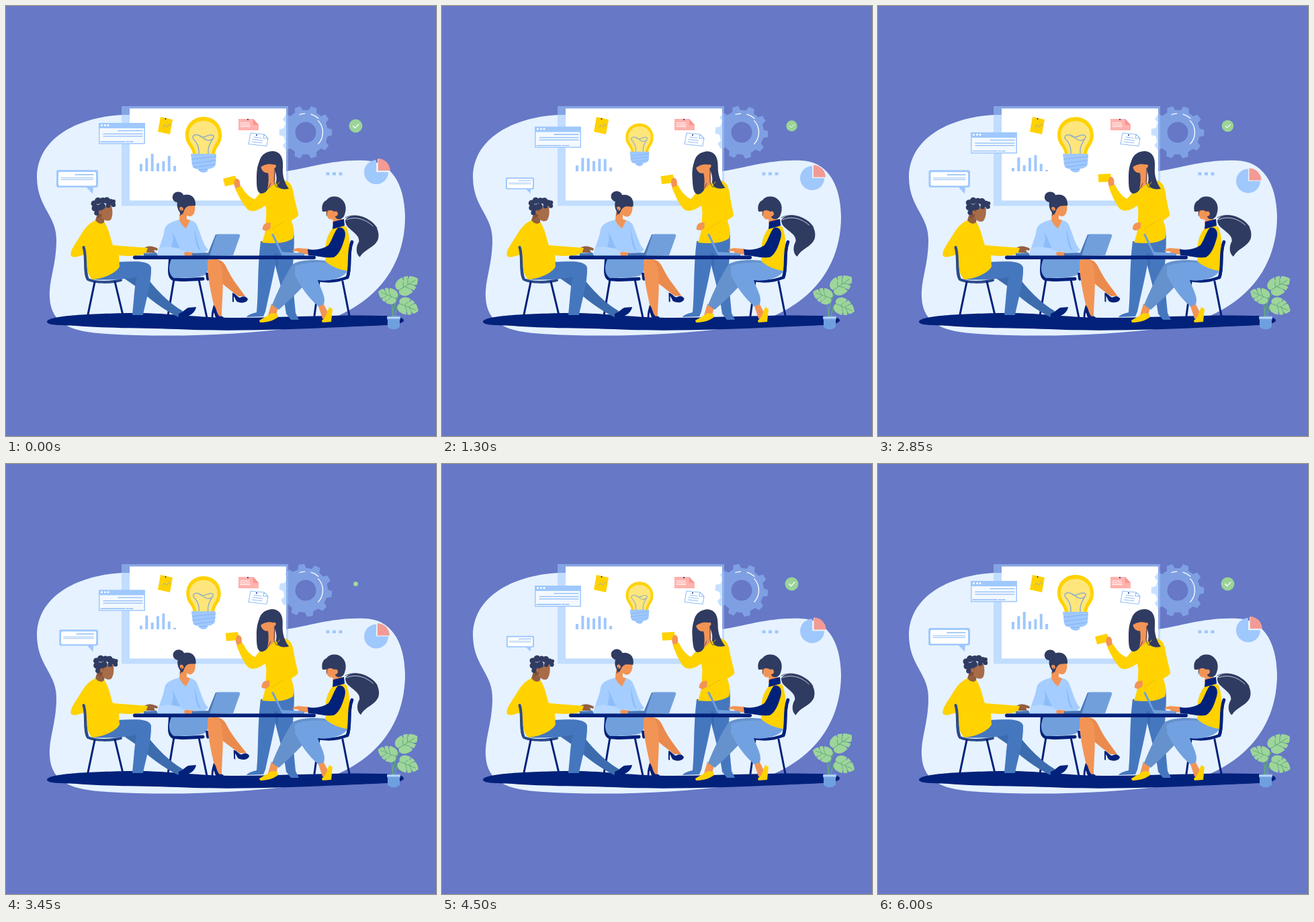
Recreate the animation shown at these times as an HTML page with a canvas. Size 640x640 px, loop 6.1 s.

```html
<!DOCTYPE html>
<html lang="en">
<head>
<meta charset="utf-8">
<title>Team meeting</title>
<style>
html, body { margin: 0; width: 100%; height: 100%; overflow: hidden; background: #6678c6; }
canvas { display: block; width: 100vw; height: 100vh; }
</style>
</head>
<body>
<canvas id="stage" width="640" height="640"></canvas>
<script>
const g = document.getElementById('stage').getContext('2d');
const LOOP = 6100, STEP = 50, TAU = Math.PI * 2;
const C = {
  bg: '#6678c6', blob: '#e6f2ff', sky: '#9fc8fd', navy: '#02217a', hair: '#303b61',
  yellow: '#ffd200', skin: '#f29455', brown: '#925f41', jeans: '#4577bf', dark: '#3c6cae',
  steel: '#709fdc', denim: '#6592cc', leaf: '#9dd59a', stem: '#5fa67e', white: '#fff', pink: '#f39a94'
};

const fill = (c, d) => { g.fillStyle = c; g.fill(new Path2D(d)); };
const line = (c, w, d) => { g.strokeStyle = c; g.lineWidth = w; g.stroke(new Path2D(d)); };
const box = (c, x, y, w, h, r = 0) => {
  g.fillStyle = c; g.beginPath(); g.roundRect(x, y, w, h, r); g.fill();
};
const oval = (c, x, y, rx, ry = rx, a = 0) => {
  g.fillStyle = c; g.beginPath(); g.ellipse(x, y, rx, ry, a, 0, TAU); g.fill();
};
// Draws around a pivot, with optional rotation (degrees), scale and shift.
function pose(x, y, { rot = 0, k = 1, dx = 0, dy = 0 }, draw) {
  g.save();
  g.translate(x + dx, y + dy);
  g.rotate(rot * Math.PI / 180);
  g.scale(k, k);
  g.translate(-x, -y);
  draw();
  g.restore();
}

const wave = (t, period, shift = 0) => 0.5 - 0.5 * Math.cos(TAU * (t + shift) / period);
// 0 to 1 to 0 every 1500 ms, peaking a little before the middle.
function pulse(t) {
  const p = t % 1500, u = p < 680 ? p / 680 : (1500 - p) / 820;
  return 0.5 * u + 0.25 * (1 - Math.cos(Math.PI * u));
}

function backdrop() {
  box(C.bg, 0, 0, 640, 640);
  fill(C.blob, 'M184 162C126 161 46 187 46 256C47 302 77 312 75 352C74 388 64 407 65 434C67 474 98 485 150 488C250 494 350 489 430 479C512 468 594 416 594 313C593 261 571 231 534 230C488 228 451 241 417 246L417 162Z');
  box('rgba(160,204,255,.53)', 172, 149, 248, 148.5);
  box(C.white, 184, 152.5, 233, 137);
}

function notes() {
  fill(C.yellow, 'M230 165L248 169L244 191L226 187Z');
  oval(C.navy, 237.5, 168, 1);
  line('#b8b48c', .9, 'M233 181C236 174 239 184 243 176M235 177L241 181M240 175L245 178');
  fill('#ffb2ae', 'M346 168L368 168L376 177L376 185L346 185Z');
  fill('#ff928e', 'M368 168L376 177L368 177Z');
  oval(C.navy, 360, 169, 1);
  line(C.white, 1.2, 'M349 174L362 174M349 177L363 177M349 179.5L363 179.5');
  fill(C.white, 'M364 189L384 191L390 197L388 208.5L361 205.5Z');
  line('#91bdf8', 1.1, 'M364 189L384 191L390 197L388 208.5L361 205.5ZM384 191L383 197L390 197');
  line('#91bdf8', 1.1, 'M369 195L380 196.5M367 198.5L382 200.3M366 202L381 203.7');
  oval(C.navy, 373, 192, 1);
}

function bars(t) {
  const from = [11, 19.5, 26, 12, 15, 23, 8], to = [5, 20.5, 9, 20, 24, 11, 2], u = wave(t, 6000);
  from.forEach((h, i) => {
    const v = h + (to[i] - h) * u;
    box(C.sky, 199 + i * 8.35, 246 - v, 4, v);
  });
}

function bulb(t) {
  pose(294, 206.5, { k: 1 - 0.245 * wave(t, 3000) }, () => {
    fill(C.yellow, 'M294 165C278 165 267 177 267 192C267 207 277 209 278 221L311 221C312 209 321 207 321 192C321 177 310 165 294 165Z');
    fill('#ffe67c', 'M294 171C281 171 272 180 272 192C272 204 281 207 283 221L306 221C307 207 316 204 316 192C316 180 307 171 294 171Z');
    line('#93aec5', 1.5, 'M287 220C288 208 283 202 279 198C275 193 283 189 289 194C294 198 299 192 304 192C312 191 310 199 302 200C296 201 293 194 286 192M301 220C300 210 304 204 308 197');
    fill(C.sky, 'M275 220L313 220L312 236C310 242 303 242 300 243L300 246Q294 250 288 246L286 243C279 242 278 240 277 236Z');
    line('#83b2f4', 1, 'M277 228L312 224M277 234L312 230M279 240L310 236M287 244L300 243');
  });
}

function win(t) {
  pose(0, 0, { dy: 14 * wave(t, 6000) }, () => {
    box(C.sky, 138, 174, 69, 31.5);
    box('#f4f9ff', 139.5, 182, 66, 22);
    [142.5, 147.5, 152].forEach(x => oval(C.white, x, 177.5, 1.5));
    line('#8ebcf7', 1.3, 'M167 185.7L203 185.7M145 190.3L203 190.3M145 193.8L203 193.8M141 202L177 202M179 202L183 202M184.5 202L189 202');
  });
}

function bubble(t) {
  pose(137, 279, { k: 1 - 0.335 * wave(t, 3000) }, () => {
    fill(C.sky, 'M118 268L130 268L129 279.5Z');
    box(C.sky, 75, 244, 62, 26, 3);
    box(C.white, 78, 247, 56, 20.5, 2);
    line('#8ebcf7', 1.6, 'M103 251L130 251');
    line('#8ebcf7', 1, 'M82 255.8L130 255.8M82 258.3L130 258.3');
  });
}

function gear(t) {
  const turn = 42 * wave(t, 3000) * Math.PI / 180, cx = 446, cy = 188;
  const at = (r, a) => [cx + r * Math.cos(a), cy + r * Math.sin(a)];
  g.beginPath();
  for (let i = 0; i < 10; i++) {
    const a = turn + i * TAU / 10;
    [[33, -.19], [39.5, -.11], [39.5, .11], [33, .19]].forEach(([r, d]) => g.lineTo(...at(r, a + d)));
    g.arc(cx, cy, 33, a + .19, a + TAU / 10 - .19);
  }
  g.closePath();
  g.moveTo(cx + 15.5, cy);
  g.arc(cx, cy, 15.5, 0, TAU);
  g.fillStyle = 'rgba(150,196,255,.52)';
  g.fill('evenodd');
  g.strokeStyle = C.white; g.lineWidth = 1.3;
  [[-.75, .75], [-1.28, -.83], [-1.9, -1.62]].forEach(([a, b]) => {
    g.beginPath(); g.arc(cx, cy, a < -.8 ? 28 : 25.5, a, b); g.stroke();
  });
}

function badge(t) {
  pose(520.5, 178.5, { k: 1 - 0.92 * pulse(t) }, () => {
    oval('#9bd397', 520.5, 178.5, 10);
    line(C.white, 1.2, 'M516.5 178.5L519.5 181.5L525 176');
  });
}

function pie(t) {
  const u = Math.pow(wave(t, 6000, 600), 1.25), gap = 2.8 - 1.4 * u;
  for (let i = 0; i < 3; i++) box(C.sky, 476.5 + i * 9.5, 247.5, 5, 4.5, .5);
  pose(0, 0, { dy: 15 * u - .5 }, () => {
    fill(C.sky, 'M551 247L569 247A18 18 0 1 1 551 229Z');
    pose(551, 247, { dx: gap, dy: -gap + .5 }, () => {
      line(C.blob, 1.4, 'M551 230L551 247L568 247');
      fill(C.pink, 'M551 247L551 229A18 18 0 0 1 569 247Z');
    });
  });
}

function floor() {
  fill(C.navy, 'M61 470C62 461 120 458 185 457C240 456 280 464 345 464C430 463 500 459 560 461C578 461 592 463 592 468C591 476 555 475 500 478C430 481 350 484 280 482C215 479 150 480 105 476C76 475 62 475 61 470Z');
}

function chairs() {
  line('#2b4b8b', 4, 'M115.5 359C122 374 115 396 122 407C133 412 156 412 171 408');
  line(C.navy, 3, 'M132 411L122 459M162 410L173.5 458M250 407L241 461M287 407L299 464M466 410L459 461M501 410L511 461');
  line(C.navy, 5, 'M244 362C247 380 239 400 248 406C262 409 280 407 293 406');
  line(C.navy, 4.5, 'M515 351C508 367 514 390 508 404C491 411 473 410 460 407');
}

function man(h) {
  fill(C.dark, 'M165 398L204 397C224 424 244 443 263 454L256 463C235 452 211 435 197 420Z');
  fill(C.navy, 'M257 458C263 456 267 451 271 449L283 448C282 454 277 460 269 462L257 462Z');
  fill(C.jeans, 'M127 407C138 400 155 388 166 381C190 380 213 378 216 389C217 411 208 439 204 460L188 460C191 432 191 417 195 403C172 408 149 408 127 407Z');
  fill(C.brown, 'M205 361C211 356 218 357 226 361L225 364L220 363L222 367L209 367Z');
  fill(C.yellow, 'M133 319C122 324 117 331 110 343C103 354 94 366 97 372C101 376 110 372 116 370C120 383 119 398 128 407C145 406 163 398 169 388L168 371C182 373 196 372 208 369L211 360C193 359 174 357 159 356C155 344 153 331 146 321Z');
  line('#2b4b8b', 4, 'M115.5 359C120 371 116 391 121 405');
  fill(C.brown, 'M137 306L147 313L146 322Q140 327 133 319Z');
  pose(141, 316, { rot: h * 1.5, dx: h * .2 }, () => {
    fill('#a86c48', 'M143 299L157 297C159 305 159 313 156 318C151 322 143 318 141 311Z');
    fill('#844f35', 'M137 304L144 300L142 313L136 317Z');
    // Curls
    [[131, 294, 4.5], [132, 301, 4.5], [137, 290, 5], [144, 289.5, 4.5], [150, 289.5, 5], [156, 292, 4.7],
      [160, 291, 3], [160, 296, 3.2], [152, 297, 3.5], [143, 298, 5], [137, 301, 5.5], [135, 308, 3.8]]
      .forEach(([x, y, r]) => oval(C.hair, x, y, r));
    fill('#a86c48', 'M138 305Q143 302 143 309Q140 312 138 308Z');
  });
}

function seatedWoman(t) {
  const u = wave(t, 3000);
  fill(C.steel, 'M246 377L302 376C305 385 301 397 295 401C281 406 263 404 250 405C241 399 242 386 246 377Z');
  fill(C.navy, 'M297 397L302 397L302 408Q299 410 298 406Z');
  pose(308, 382, { rot: -3.2 * pulse(t) }, () => {
    fill('#ea8a4d', 'M302 379C316 374 324 379 329 391C337 408 347 419 356 432L346 432C331 421 313 407 301 391Z');
    fill(C.navy, 'M337 427C341 427 344 433 348 434C352 433 355 430 360 436C359 442 350 443 344 440C342 439 341 434 339 432L339 441L337 440Z');
  });
  fill(C.skin, 'M300 379C309 374 318 378 321 389C325 414 321 440 321 465L313 464C309 439 299 409 300 379Z');
  fill(C.navy, 'M309 445C314 450 313 458 318 462C322 461 325 463 325 467L316 468C311 465 311 458 309 456L308 468L306 467C305 458 307 452 309 445Z');
  fill('#a5cdff', 'M258 318C247 321 238 324 236 333C234 347 228 356 225 372L269 372L272 365L290 371L301 363C292 354 289 335 283 324C278 318 270 317 258 318Z');
  fill('#8dbdf8', 'M246 336C252 345 246 354 246 361L259 360C254 352 252 341 246 336ZM280 330C282 342 281 354 287 363L290 364C284 353 284 342 280 330Z');
  fill('#b6d7ff', 'M225 372L229 360C240 357 252 358 268 366L267 372Z');
  fill(C.skin, 'M259 306L269 307L269 317L274 319L268 331Q260 325 258 318ZM265 367Q274 364 283 369L282 372L266 372Z');
  pose(267, 314, { rot: 6 * u, dx: .8 * u }, () => {
    fill(C.skin, 'M262 294L280 293C283 301 281 311 275 313C268 314 262 306 260 300Z');
    oval(C.hair, 256.3, 284.5, 8.6, 8);
    fill(C.hair, 'M258 306C251 295 256 283 266 281C277 279 283 287 282 297C277 298 270 296 267 301C264 304 265 309 261 311Z');
    fill(C.skin, 'M258 300Q263 297 264 303Q262 307 259 304Z');
    line(C.hair, 1, 'M261 303L259 312');
  });
}

function standingWoman(t, h) {
  const u = wave(t, 3000), s = wave(t, 6000, 1000);
  fill(C.jeans, 'M379 350L407 350C401 391 392 427 386 455L383 462L358 463Q360 459 373 456C376 425 374 388 379 350Z');
  fill(C.jeans, 'M398 352L428 334C431 360 425 385 427 415L431 457L436 467L424 467L417 458C413 428 404 401 398 374Z');
  fill(C.dark, 'M399 368L405 368L404 397Z');
  // Raised arm
  pose(367, 298, { rot: h * .95, dy: -.15 * h }, () => {
    pose(343, 262, { rot: 1.1 * h }, () => fill(C.yellow, 'M323 257L341 252.5L345 264L326 268.5Z'));
    fill(C.skin, 'M340 260C342 255 347 257 348 262L349 270L343 273Q338 268 340 260Z');
    fill(C.yellow, 'M341 272L350 268C356 279 364 286 371 288L377 301C372 306 364 307 359 302C351 293 346 282 341 272Z');
  });
  fill(C.yellow, 'M393 264C383 270 378 279 369 289L364 303C373 307 381 300 386 297C389 307 386 319 387 326C386 336 384 343 381 352C397 354 416 354 427 346C430 337 428 329 425 321L429 287C427 270 425 261 412 259Z');
  pose(418, 275, { rot: 2.6 * s - 1 }, () => {
    fill(C.yellow, 'M414 260C425 261 428 275 429 285L435 311C431 319 407 326 397 333L392 325C401 320 411 312 416 306Z');
  });
  pose(0, 0, { dx: 1 - 5 * s, dy: -s }, () => fill(C.skin, 'M394 323C386 322 382 326 382 333C386 336 390 335 394 331Z'));
  line('#e5b900', .8, 'M396 332Q406 325 414 321');
  pose(399, 262, { rot: -3.5 * u }, () => {
    fill(C.hair, 'M383 222C374 232 373 245 373 255C373 268 373 277 379 279C385 280 391 274 393 264L398 232Z');
    fill(C.skin, 'M390 240L401 238L401 260L398 266Q394 270 389 273Q392 258 390 248Z');
    fill(C.skin, 'M379 237L397 230C402 236 399 244 393 248C385 250 380 246 379 237Z');
    fill(C.hair, 'M377 242C375 228 381 217 397 216C410 217 413 228 412 240C411 253 415 264 421 272C411 274 403 272 402 262C404 252 400 246 398 236C391 234 382 236 377 242Z');
    fill(C.skin, 'M397 237Q402 234 402 239Q400 243 397 241Z');
    line(C.hair, .9, 'M400 243L399 262Q402 274 407 268');
    line('#e8b55d', .8, 'M400 262Q403 270 407 262');
  });
  line(C.hair, .8, 'M394 264Q391 272 387 275');
}

function rightWoman(t) {
  const s = wave(t, 6000, 800);
  fill(C.skin, 'M395 443L405 449L402 460L389 464ZM464 444L473 444L479 456L475 467L471 465Z');
  fill(C.yellow, 'M377 468C384 464 391 460 395 457L404 458L405 463C397 469 388 471 378 471ZM470 468C477 463 478 455 481 448L486 451L484 470L471 471Z');
  fill(C.denim, 'M509 392C493 376 440 374 426 385C414 404 404 425 396 445L406 452C424 437 440 419 453 407L509 394Z');
  fill('#72a1e1', 'M430 387C449 380 486 378 509 391C508 403 484 411 464 408C468 421 477 433 473 444L465 447C450 435 436 414 430 400Z');
  fill(C.yellow, 'M485 332C477 344 475 353 476 366L475 380C485 388 497 393 508 394C512 369 514 344 506 328L492 327Z');
  fill(C.skin, 'M487 310L499 311L500 322L486 325ZM450 361C441 362 436 358 428 362L426 365L434 365L437 369L451 370Z');
  fill(C.navy, 'M487 321L503 317L504 327L486 332Z');
  fill(C.navy, 'M494 330C503 328 507 336 504 346C501 356 497 369 488 374C475 376 461 371 450 371L449 362C461 364 471 362 480 356C486 347 488 337 494 330Z');
  pose(507, 316, { rot: -3.2 * s }, () => {
    fill(C.hair, 'M505 319C510 309 529 311 540 319C552 325 557 339 553 349C547 361 533 362 526 374C519 368 521 357 525 351C526 342 518 338 511 331C506 327 505 323 505 319Z');
    line(C.blob, .8, 'M507 318C522 312 537 319 546 328');
    line(C.hair, .9, 'M505 315C521 307 543 316 552 331');
  });
  fill(C.skin, 'M476 303L494 300L494 315Q489 319 481 317Q476 313 476 303Z');
  fill(C.hair, 'M471 306C469 297 472 291 477 289C482 282 494 282 500 288C507 294 507 304 503 313C499 319 492 318 490 314L489 307C487 304 484 304 481 304C478 306 474 306 471 306Z');
  fill(C.skin, 'M488 306Q494 304 494 310Q492 315 488 312Z');
  line(C.hair, .8, 'M478 305L477 312');
}

function table() {
  fill('#4a78b8', 'M205 368L224 367L226 372L205 372ZM277 368L303 367L303 372L277 372ZM312 340L316 340L306 372L299 372Z');
  fill(C.steel, 'M315 339.5L346 339.5Q349 340 348 343L338 371L303 372L313 341Z');
  fill(C.steel, 'M395 340L398 339L411 366L444 368L444 372L411 372Z');
  box(C.navy, 189, 371.6, 272, 5.4, 2.7);
}

function leaf(x, y, size, angle) {
  g.save();
  g.translate(x, y);
  g.rotate(angle * Math.PI / 180);
  g.scale(size, size);
  fill(C.leaf, 'M0 0C-5 -5 -1 -13 8 -14C18 -15 29 -9 34 1C28 11 17 16 8 14C-1 13 -5 5 0 0Z');
  line(C.stem, .9, 'M0 0L29 1M8 0L12 -7M16 0L21 -7M10 0L15 7M18 1L23 6');
  fill(C.bg, 'M15 -16L18 -16L14 -7ZM25 -13L28 -11L21 -6ZM17 16L20 15L15 7ZM26 12L29 9L22 6Z');
  g.restore();
}

function plant(t) {
  const u = wave(t, 3000);
  pose(577, 465, { rot: -2.8 * u }, () => {
    line(C.stem, 1.7, 'M576 464C576 447 582 432 592 420M575 464C576 447 574 439 569 432');
    leaf(585, 423, .97, -34);
    leaf(580, 435, .82, 200);
  });
  pose(577, 465, { rot: 1.2 * u }, () => {
    line(C.stem, 1.7, 'M579 464C580 450 583 441 593 440');
    leaf(586, 443, .88, 20);
  });
  fill('#6e9fdf', 'M568 464L586 464L586 478Q577 485 568 478Z');
  box('#83b1ec', 567, 461.5, 20, 5, 1);
  line(C.white, 1, 'M568 464L586 464');
}

function draw(t) {
  // Shared sway of the raised hand and the seated man's head
  const h = 6 * wave(t, 2000) - 2 * Math.sin(TAU * t / 6000);
  g.lineCap = 'round';
  g.lineJoin = 'round';
  backdrop();
  notes();
  bulb(t);
  bars(t);
  win(t);
  bubble(t);
  gear(t);
  badge(t);
  pie(t);
  floor();
  chairs();
  standingWoman(t, h);
  man(h);
  seatedWoman(t);
  rightWoman(t);
  line(C.navy, 4.5, 'M515 351C508 367 514 390 508 404');
  table();
  plant(t);
}

const start = performance.now();
function tick(now) {
  const t = Math.max(0, now - start) % LOOP;
  draw(Math.min(6000, Math.floor(t / STEP) * STEP));
  requestAnimationFrame(tick);
}
draw(0);
requestAnimationFrame(tick);
</script>
</body>
</html>
```
